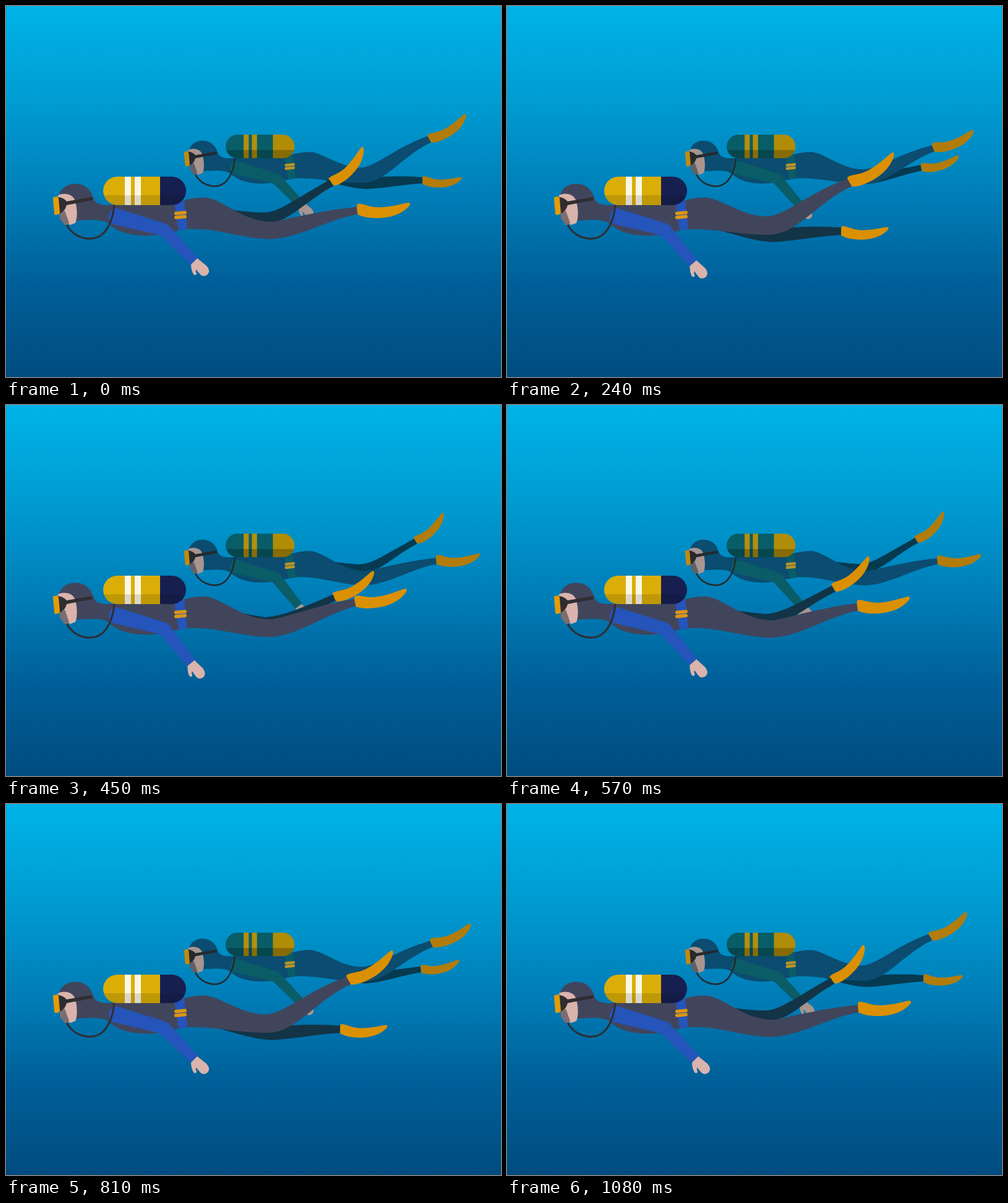
An HTML page for the animation above (1110 ms loop, 800 by 600 pixels).

```html
<!DOCTYPE html>
<html lang="en">
<head>
<meta charset="utf-8">
<title>Divers</title>
<style>
  html, body { margin: 0; width: 100%; height: 100%; overflow: hidden; }
  body { background: linear-gradient(#00b3e8, #009dd3 25%, #007fb9 50%, #005f98 75%, #004c80); }
  svg { display: block; width: 100vw; height: 100vh; }
</style>
</head>
<body>
<svg id="stage" viewBox="0 0 800 600">
  <defs>
    <clipPath id="tank"><rect x="157" y="276" width="134" height="46" rx="23"/></clipPath>
  </defs>
</svg>
<script>
const LOOP = 1110, STEP = 30;

// Kick amount by time: 0 = near leg low, 1 = near leg high
const FRONT_KICK = [[0, 0], [135, .52], [240, .99], [270, 1], [360, .87], [440, .38], [530, 0],
  [570, .14], [690, .68], [795, 1], [810, .99], [960, .38], [1080, 0]];
const BACK_KICK = [[0, 1], [120, .93], [240, .69], [360, .24], [520, 0], [570, .04],
  [690, .42], [810, .78], [960, .955], [1080, 1]];

const FRONT = {
  suit: '#41455c', farLeg: '#123446', sleeve: '#2554ba', skin: '#dab3ac', gear: '#7a6e71',
  fin: '#da9002', lens: '#e39c0a', buckle: '#dc9611', dark: '#2f2d31',
  tank: '#dbae07', stripe: '#fbf7e6', cap: '#171f50', shade: .13
};
const BACK = {
  suit: '#0b4c70', farLeg: '#053a50', sleeve: '#0a5c67', skin: '#a8958f', gear: '#5f6167',
  fin: '#b27c0b', lens: '#c28a10', buckle: '#b9922a', dark: '#25292d',
  tank: '#085d67', stripe: '#b48f0b', cap: '#b18c06', shade: .24
};

const BODY_TOP = 'M136 300Q141 308 142 313Q146 321 160 322L270 320C290 312 310 309 325 310';
const BODY_END = 'C275 363 262 368 250 370C215 374 184 370 165 351C155 344 130 346 112 347L104 310Z';
const NEAR_LEG = [
  'C355 316 385 350 432 349C470 341 510 331 567 325L568 337C520 345 470 377 425 377C375 375 340 358 293 361',
  'C352 315 385 342 422 340C450 338 490 300 550 279L557 291C500 318 470 368 425 370C375 370 340 360 293 361'
];
const FAR_LEG = [
  'M320 325C360 329 395 334 415 334C440 334 455 320 523 281L529 291C490 312 460 345 432 350C400 352 360 345 320 350Z',
  'M320 325C360 340 395 350 425 362C455 357 500 356 540 359L540 371C500 373 470 380 430 382C390 380 360 365 320 358Z'
];
const FIN = 'M1 -9C10 -11 18 -3 38 -3.5C58 -4 74 -10 84 -11Q88 -10 84 -5C76 4 60 14 32 14C14 14 5 10 1 8Q-2 0 1 -9Z';
const HAND = 'M309 408L324 420Q331 428 326 434Q319 440 313 433L307 426Q306 429 308 433Q307 437 303 434Q299 427 299 418Z';

const mix = (a, b, k) => a + (b - a) * k;

function mixPath([a, b], k) {
  const ends = b.match(/\d+/g);
  let i = 0;
  return a.replace(/\d+/g, n => mix(+n, +ends[i++], k).toFixed(2));
}

// Monotone cubic through the table; flat at both ends and at turning points
function curve(keys, t) {
  const last = keys.length - 1;
  if (t >= keys[last][0]) return keys[last][1];
  const rate = i => (keys[i + 1][1] - keys[i][1]) / (keys[i + 1][0] - keys[i][0]);
  const slope = i => {
    if (i === 0 || i === last) return 0;
    const a = rate(i - 1), b = rate(i);
    return a * b > 0 ? 2 * a * b / (a + b) : 0;
  };
  const i = keys.findIndex((key, n) => n < last && t < keys[n + 1][0]);
  const [t0, v0] = keys[i], [t1, v1] = keys[i + 1];
  const d = t1 - t0, u = (t - t0) / d, w = 1 - u;
  return v0 * w * w * (1 + 2 * u) + v1 * u * u * (3 - 2 * u)
    + d * u * w * (slope(i) * w - slope(i + 1) * u);
}

const stage = document.getElementById('stage');

function addDiver(c, transform, keys) {
  const g = document.createElementNS('http://www.w3.org/2000/svg', 'g');
  if (transform) g.setAttribute('transform', transform);
  const path = (d, fill) => `<path d="${d}" fill="${fill}"/>`;
  const box = (x, y, w, h, fill, extra = '') =>
    `<rect x="${x}" y="${y}" width="${w}" height="${h}" fill="${fill}" ${extra}/>`;
  const part = (name, fill, d = '') => `<path data-part="${name}" d="${d}" fill="${fill}"/>`;
  const buckle = y => box(272, y, 20, 5.5, c.buckle, `rx="2.5" transform="rotate(-6 282 ${y + 3})"`);

  g.innerHTML =
    part('farFin', c.fin, FIN) + part('farLeg', c.farLeg) +
    part('nearFin', c.fin, FIN) + part('body', c.suit) +
    // head
    path('M86 305C92 284 125 281 137 301Q143 312 143 322L135 346L110 347Z', c.suit) +
    path('M84 306C95 301 109 304 112 316C116 330 115 345 112 351L104 354L95 350L86 334Z', c.skin) +
    path('M87 335L95 331L102 351Q98 357 94 353L87 344Z', c.gear) +
    path('M83 309Q92 309 98 316L139 309L140 314L98 322Q95 333 86 336Z', c.dark) +
    path('M76 311Q75 309 78 309L82 308Q84 308 85 311L87 334Q87 337 84 337L81 338Q78 338 78 335Z', c.lens) +
    // belt
    path('M272 318L288 314L293 360L279 364Z', c.sleeve) + buckle(332) + buckle(338.5) +
    // tank
    '<g clip-path="url(#tank)">' +
    box(157, 276, 93, 46, c.tank) + box(249, 276, 42, 46, c.cap) +
    box(192, 276, 10, 46, c.stripe) + box(208, 276, 10, 46, c.stripe) +
    box(157, 306, 134, 16, '#000', `opacity="${c.shade}"`) + '</g>' +
    // arm
    path('M175 326L255 351Q262 354 262 360L250 371L170 352Q160 340 175 326Z', c.sleeve) +
    '<g data-part="forearm">' + path(HAND, c.skin) +
    path('M256 351L262 354L310 407L298 418L248 370Z', c.sleeve) + '</g>' +
    `<path d="M98 354C112 378 142 383 158 367C168 356 173 342 175 322" fill="none" stroke="${c.dark}" stroke-width="3"/>`;
  stage.append(g);

  const set = (name, attr, value) =>
    g.querySelector(`[data-part=${name}]`).setAttribute(attr, value);

  return t => {
    const far = curve(keys, t);
    const near = far - .36 * far * (1 - far);
    const reach = t < 810 ? Math.sin(Math.PI * t / 810) ** 2 : 0;
    set('body', 'd', BODY_TOP + mixPath(NEAR_LEG, near) + BODY_END);
    set('farLeg', 'd', mixPath(FAR_LEG, far));
    set('nearFin', 'transform',
      `translate(${mix(567, 553, near)} ${mix(329, 285, near)}) rotate(${-28 * near})`);
    set('farFin', 'transform',
      `translate(${mix(526, 540, far)} ${mix(286, 365, far)}) rotate(${mix(-42.4, 2.8, far)}) scale(.89)`);
    set('forearm', 'transform', `rotate(${5.5 * reach} 256 362)`);
  };
}

const divers = [
  addDiver(BACK, 'translate(224.7 -21) scale(.83)', BACK_KICK),
  addDiver(FRONT, '', FRONT_KICK)
];

const start = performance.now();
function draw() {
  const t = Math.floor((performance.now() - start) % LOOP / STEP) * STEP;
  divers.forEach(pose => pose(t));
  requestAnimationFrame(draw);
}
draw();
</script>
</body>
</html>
```
